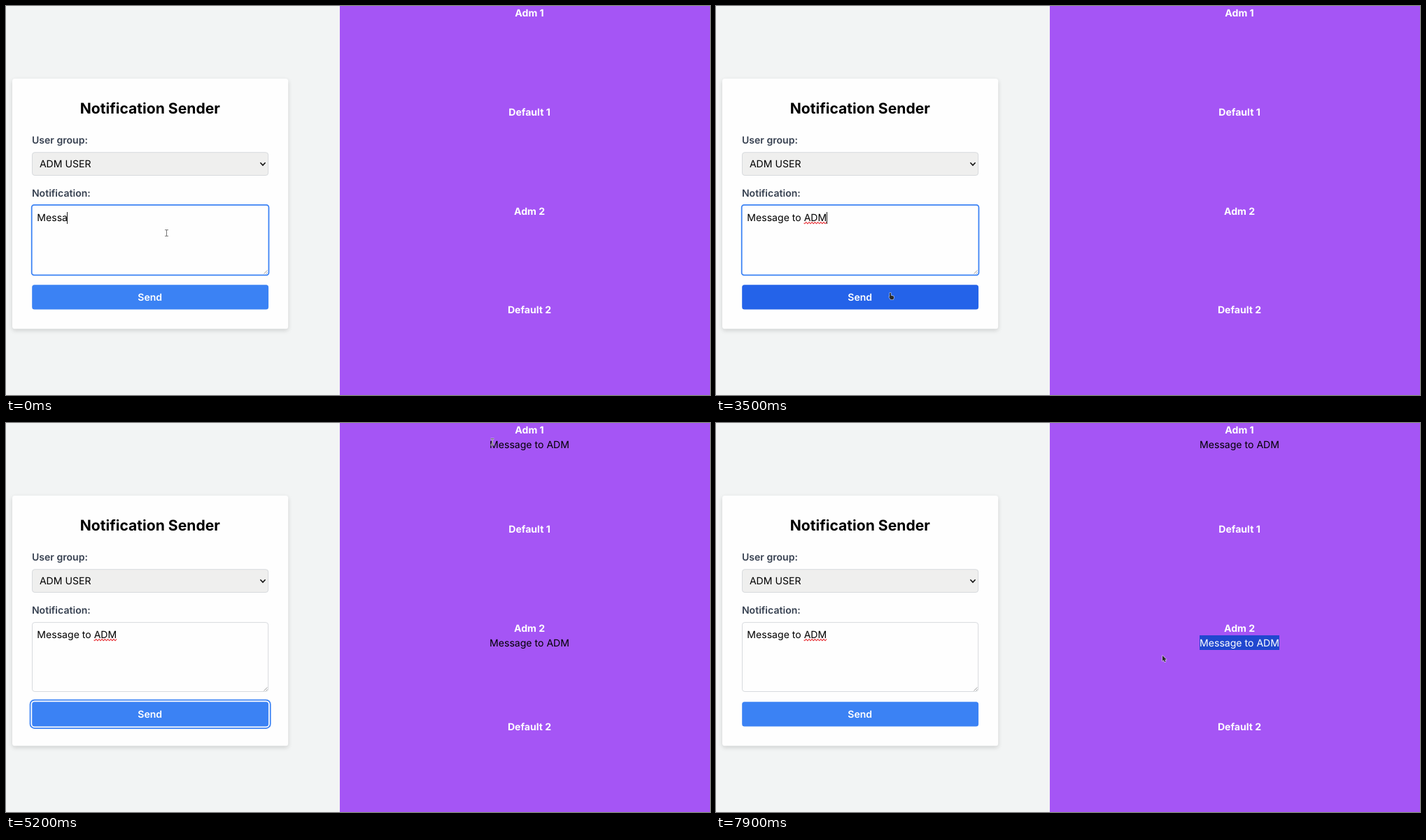
Animation of 1006 by 557 pixels, one loop 8 s. Source, as an HTML page with a canvas:

```html
<!DOCTYPE html>
<html lang="en">
<head>
<meta charset="utf-8">
<title>Notification Sender</title>
<style>
  html, body { margin: 0; width: 100%; height: 100%; overflow: hidden; }
  canvas { display: block; }
</style>
</head>
<body>
<canvas id="stage" width="1006" height="557"></canvas>
<script>
const ctx = document.getElementById('stage').getContext('2d');
const LOOP = 8000, TICK = 100;
const ZOOM = .88, SIZE = 16 * ZOOM, LINE = 24 * ZOOM, RADIUS = 4 * ZOOM;
const LEFT = 37.2, WIDTH = 384 * ZOOM, CENTER = LEFT + WIDTH / 2, TEXT_X = 44.3;
const PANEL_X = 748, FIRST_LINE = 14.9, ROW = 141.8;
const BLUE = '#3b82f4', DARK_BLUE = '#2463e9', BORDER = '#d3d6da';

const MESSAGE = 'Message to ADM';
const keyTimes = [300, 350, 400, 600, 1100, 1400, 2000, 2100, 2300];
const LETTERS_AT_START = MESSAGE.length - keyTimes.length;
const SPELLCHECK = 3200, CLICK = 3700, FADE = 3800;
const DRAG_1 = 5400, DRAG_2 = 7100, DRAG_LAG = 85;

// Each move eases out to its end point: [start, end, x, y]
const moves = [
  [3100, 3500, 249, 411],
  [3700, 4000, 259, 366],
  [4200, 4900, 717, 28],
  [4900, 5200, 695, 27],
  [DRAG_1, 5700, 825, 29],
  [5700, 6000, 701, 227],
  [6000, 6800, 694, 314],
  [DRAG_2, 7300, 808, 313],
  [7500, 7800, 599, 334],
  [7800, 7900, 638, 333]
];

const clamp = v => Math.min(1, Math.max(0, v));

function pointerAt(t) {
  let x = 229.5, y = 325;
  for (const [start, end, toX, toY] of moves) {
    const k = 1 - (1 - clamp((t - start) / (end - start))) ** 2;
    x += (toX - x) * k;
    y += (toY - y) * k;
  }
  return [x, y];
}

function setFont(weight, size = SIZE) {
  ctx.font = `${weight} ${size}px Inter, sans-serif`;
}

function text(str, x, y, color, weight = 400, align = 'left', size = SIZE) {
  setFont(weight, size);
  ctx.textAlign = align;
  ctx.fillStyle = color;
  ctx.fillText(str, x, y);
}

function textWidth(str) {
  setFont(400);
  return ctx.measureText(str).width;
}

function box(x, y, w, h, radius, fill, stroke, lineWidth = 1) {
  ctx.beginPath();
  ctx.roundRect(x, y, w, h, radius);
  if (fill) { ctx.fillStyle = fill; ctx.fill(); }
  if (stroke) { ctx.strokeStyle = stroke; ctx.lineWidth = lineWidth; ctx.stroke(); }
}

function line(points, color, width) {
  ctx.beginPath();
  points.forEach(p => ctx.lineTo(...p));
  ctx.strokeStyle = color;
  ctx.lineWidth = width;
  ctx.stroke();
}

function drawCard() {
  ctx.save();
  ctx.shadowColor = 'rgba(0,0,0,.15)';
  ctx.shadowBlur = 6;
  ctx.shadowOffsetY = 2.5;
  box(9, 104, 448 * ZOOM, 358.3, RADIUS, '#fefefe');
  ctx.restore();
  text('Notification Sender', CENTER - .4, 153.6, '#000', 700, 'center', 24 * ZOOM);
  text('User group:', LEFT - .3, 196.6, '#374151', 600);
  box(37.5, 209.7, 337.2, 32.8, RADIUS, '#efefee', BORDER, ZOOM);
  text('ADM USER', 47.9, 231.3, '#000');
  line([[363.4, 224.3], [367, 228], [370.6, 224.3]], '#111', 1.6);
  text('Notification:', LEFT - .3, 272.5, '#374151', 600);
}

function drawTextarea(t, focused) {
  if (focused) box(36.7, 284.9, 338.8, 100.4, RADIUS, null, BLUE, 2 * ZOOM);
  else box(37.5, 285.6, 337.2, 98.9, RADIUS, null, BORDER, ZOOM);
  line([[368.5, 383.5], [373.5, 378.5]], '#888', .8);
  line([[371.5, 383.5], [373.5, 381.5]], '#888', .8);

  const pressed = keyTimes.filter(k => k <= t);
  const shown = MESSAGE.slice(0, LETTERS_AT_START + pressed.length);
  const end = TEXT_X + textWidth(shown);
  text(shown, TEXT_X, 308.2, '#000');
  if (t >= SPELLCHECK) {
    const wave = [];
    for (let x = TEXT_X + textWidth('Message to '); x <= end; x += .5)
      wave.push([x, 310.6 + 1.1 * Math.sin(x * 1.5)]);
    line(wave, '#e8343a', 1.1);
  }
  const sinceKey = t - (pressed.pop() || 0);
  if (focused && sinceKey % 1100 < 550) {
    ctx.fillStyle = '#222';
    ctx.fillRect(Math.round(end - .5), 295, 1, 17);
  }
}

function drawButton(hover, focused) {
  const top = 399.2, height = 40 * ZOOM, gap = 3 * ZOOM;
  box(LEFT, top, WIDTH, height, RADIUS, hover ? DARK_BLUE : BLUE);
  if (focused)
    box(LEFT - gap, top - gap, WIDTH + 2 * gap, height + 2 * gap, RADIUS + gap, null, BLUE, 2 * ZOOM);
  text('Send', CENTER - .5, 421.5, '#fff', 600, 'center');
}

// Letters passed by the pointer, which the selection follows a little late
function selectedLetters(t, dragStart, left) {
  if (t < dragStart) return 0;
  const dragEnd = moves.find(m => m[0] === dragStart)[1];
  const x = pointerAt(Math.min(t - DRAG_LAG, dragEnd))[0] - left;
  return [...MESSAGE].filter((_, i) =>
    textWidth(MESSAGE.slice(0, i)) + textWidth(MESSAGE.slice(0, i + 1)) < 2 * x).length;
}

function drawMessage(t, baseline, dragStart, dropTime) {
  const left = PANEL_X - textWidth(MESSAGE) / 2;
  ctx.globalAlpha = clamp((t - FADE) / 700);
  text(MESSAGE, left, baseline, '#000');
  ctx.globalAlpha = 1;
  const count = t < dropTime ? selectedLetters(t, dragStart, left) : 0;
  if (!count) return;
  ctx.save();
  ctx.beginPath();
  ctx.rect(left, baseline - 15.7, textWidth(MESSAGE.slice(0, count)), LINE);
  ctx.clip();
  ctx.fillStyle = '#2047cf';
  ctx.fill();
  text(MESSAGE, left, baseline, '#fff');
  ctx.restore();
}

function drawPanel(t) {
  ctx.fillStyle = '#a555f5';
  ctx.fillRect(477, 0, 529, 557);
  ['Adm 1', 'Default 1', 'Adm 2', 'Default 2'].forEach((name, i) =>
    text(name, PANEL_X, FIRST_LINE + i * ROW, '#fff', 700, 'center'));
  drawMessage(t, FIRST_LINE + LINE, DRAG_1, DRAG_2);
  drawMessage(t, FIRST_LINE + LINE + 2 * ROW, DRAG_2, LOOP);
}

function pointerKind(x, y) {
  const within = (l, t, r, b) => x >= l && x <= r && y >= t && y <= b;
  if (within(37, 399, 375, 434)) return 'hand';
  const overText = within(37, 285, 375, 385) || within(691, 21, 812, 42) || within(691, 304, 812, 325);
  return overText ? 'beam' : 'arrow';
}

function drawPointer(kind, x, y) {
  ctx.save();
  ctx.translate(x, y);
  ctx.scale(ZOOM, ZOOM);
  ctx.lineJoin = 'round';
  if (kind === 'beam') {
    for (const [color, width] of [['rgba(255,255,255,.6)', 2.4], ['#666', 1]]) {
      line([[-2.8, -5], [2.8, -5]], color, width);
      line([[0, -5], [0, 5]], color, width);
      line([[-2.8, 5], [2.8, 5]], color, width);
    }
  } else {
    const path = new Path2D(kind === 'arrow'
      ? 'M0 0V9L2 7.2 3.6 10.6 5.2 9.8 3.7 6.6H6.6Z'
      : 'M-1 0Q0-1 1 0V4L5 5Q6 5.3 6 6.5L5 10.5H.5L-2 6.5Q-2 5-.9 6Z');
    ctx.strokeStyle = 'rgba(255,255,255,.75)';
    ctx.lineWidth = 1.3;
    ctx.stroke(path);
    ctx.fillStyle = '#2a2a2a';
    ctx.fill(path);
  }
  ctx.restore();
}

function draw(now) {
  const t = Math.floor(now % LOOP / TICK) * TICK;
  const [x, y] = pointerAt(t), kind = pointerKind(x, y);
  ctx.textRendering = 'geometricPrecision';
  ctx.fillStyle = '#f2f4f4';
  ctx.fillRect(0, 0, 1006, 557);
  drawCard();
  drawTextarea(t, t < CLICK);
  drawButton(kind === 'hand', t >= CLICK && t < DRAG_1);
  drawPanel(t);
  drawPointer(kind, x, y);
}

const start = performance.now();
function frame() {
  draw(performance.now() - start);
  requestAnimationFrame(frame);
}
frame();
</script>
</body>
</html>
```
